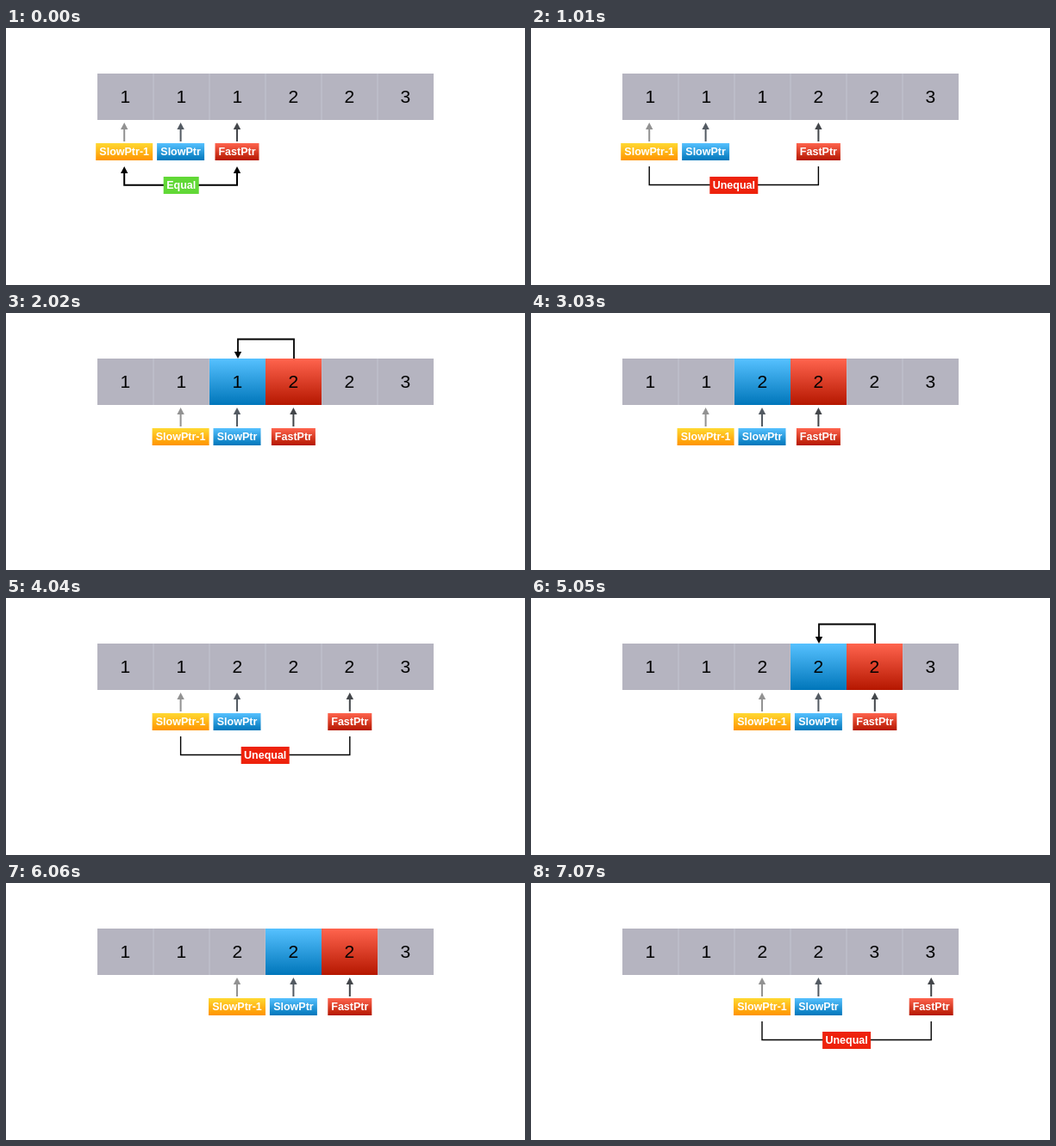
Animation of 602 by 299 pixels, one loop 8000 ms. Source, as an HTML page:

```html
<!DOCTYPE html>
<html lang="en">
<head>
<meta charset="utf-8">
<title>Slow and fast pointers</title>
<style>
  html, body { margin: 0; width: 100%; height: 100%; overflow: hidden; background: #fff; }
  svg { display: block; width: 100vw; height: 100vh; }
  text { font-family: "Liberation Sans", Arial, sans-serif; text-anchor: middle; }
  .digit { font-size: 21px; }
  .label { font-size: 12.5px; font-weight: bold; fill: #fff; }
  .line { fill: none; stroke: #000; }
</style>
</head>
<body>
<svg viewBox="0 0 602 299" id="stage"></svg>
<script>
const stage = document.getElementById('stage');
const LOOP = 8000, STEP = 1010;
const CELL = { x: 106, y: 53, w: 65, h: 54 };
const GRADIENTS = {
  yellow: ['#ffd932', '#ff9300'],
  blue: ['#56c1ff', '#0076ba'],
  red: ['#ff644e', '#b51700']
};
// kind: comparison bracket or value copy from fast to slow
const steps = [
  { digits: '111223', slow: 1, fast: 2, compare: 'Equal' },
  { digits: '111223', slow: 1, fast: 3, compare: 'Unequal' },
  { digits: '111223', slow: 2, fast: 3, copy: true, lit: true },
  { digits: '112223', slow: 2, fast: 3, lit: true },
  { digits: '112223', slow: 2, fast: 4, compare: 'Unequal' },
  { digits: '112223', slow: 3, fast: 4, copy: true, lit: true },
  { digits: '112223', slow: 3, fast: 4, lit: true },
  { digits: '112233', slow: 3, fast: 5, compare: 'Unequal' }
];

const cellX = i => CELL.x + i * CELL.w;
const pointerX = i => 137.2 + i * 65.4;

const rect = (x, y, w, h, fill) =>
  `<rect x="${x}" y="${y}" width="${w}" height="${h}" fill="${fill}"/>`;
const text = (cls, x, y, s) => `<text class="${cls}" x="${x}" y="${y}">${s}</text>`;
const line = (d, width) => `<path class="line" d="${d}" stroke-width="${width}"/>`;

// Arrowhead with its tip at (x, y); dir 1 points up, -1 points down
const head = (x, y, dir, color = '#000') =>
  `<path d="M${x} ${y}l4.2 ${8 * dir}h-8.4z" fill="${color}"/>`;

const tag = (x, y, w, fill, s) =>
  rect(x - w / 2, y, w, 20, fill) + text('label', x, y + 14.4, s);

function pointer(i, w, gradient, name, color) {
  const x = pointerX(i);
  return rect(x - 1, 117, 2, 15, color) + head(x, 110, 1, color) +
    tag(x, 134, w, `url(#${gradient})`, name);
}

function cells({ digits, slow, fast, lit }) {
  let out = rect(CELL.x, CELL.y, CELL.w * 6, CELL.h, '#b5b4c0');
  for (let i = 1; i < 6; i++) out += rect(cellX(i) - 0.5, CELL.y, 1, CELL.h, '#c3c4d0');
  if (lit) {
    out += rect(cellX(slow), CELL.y, CELL.w, CELL.h, 'url(#blue)');
    out += rect(cellX(fast), CELL.y, CELL.w, CELL.h, 'url(#red)');
  }
  [...digits].forEach((d, i) => out += text('digit', cellX(i) + 32.3, 87.3, d));
  return out;
}

function bracket({ slow, fast, compare }) {
  const a = pointerX(slow - 1), b = pointerX(fast), mid = (a + b) / 2;
  if (compare === 'Equal')
    return line(`M${a} 167V182.8H${b}V167`, 2) + head(a, 161, 1) + head(b, 161, 1) +
      tag(mid + 0.6, 173, 41, '#61d836', compare);
  return line(`M${a} 161V182.5H${b}V161`, 1.4) + tag(mid, 173, 56, '#ee220c', compare);
}

function copyArrow({ slow, fast }) {
  const a = cellX(slow) + 33, b = cellX(fast) + 33;
  return line(`M${b} 53V30.5H${a}V47`, 1.8) + head(a, 53, -1);
}

const scene = s => cells(s) +
  pointer(s.slow - 1, 66, 'yellow', 'SlowPtr-1', '#929292') +
  pointer(s.slow, 55, 'blue', 'SlowPtr', '#535a62') +
  pointer(s.fast, 51, 'red', 'FastPtr', '#43464a') +
  (s.compare ? bracket(s) : '') + (s.copy ? copyArrow(s) : '');

const defs = Object.entries(GRADIENTS).map(([id, [top, bottom]]) =>
  `<linearGradient id="${id}" x2="0" y2="1"><stop stop-color="${top}"/>` +
  `<stop offset="1" stop-color="${bottom}"/></linearGradient>`).join('');

stage.innerHTML = `<defs>${defs}</defs>` +
  steps.map(s => `<g display="none">${scene(s)}</g>`).join('');
const scenes = stage.querySelectorAll('g');

let shown = -1;
function show(now) {
  const index = Math.floor((now % LOOP) / STEP);
  if (index !== shown) {
    scenes.forEach((g, i) => g.setAttribute('display', i === index ? 'inline' : 'none'));
    shown = index;
  }
}
function tick() {
  show(performance.now());
  requestAnimationFrame(tick);
}
show(0);
requestAnimationFrame(tick);
</script>
</body>
</html>
```
